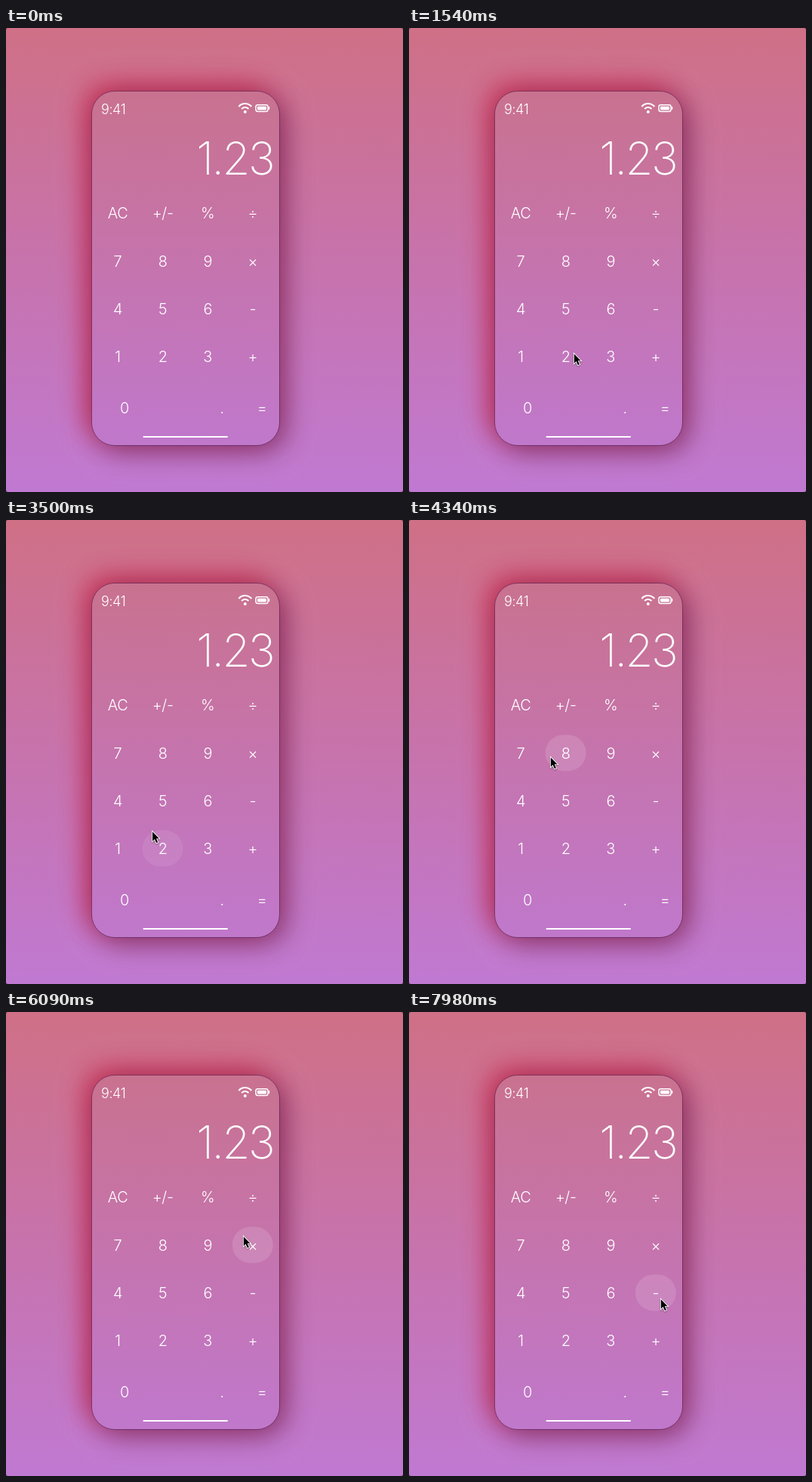
Animation of 526x614 px, one loop 8 s. Source, as an HTML page with a canvas:

```html
<!DOCTYPE html>
<html lang="en">
<head>
<meta charset="utf-8">
<title>Calculator</title>
<style>
html, body { margin: 0; width: 100%; height: 100%; overflow: hidden; background: #5a3a48; }
canvas { display: block; width: 526px; height: 614px; }
</style>
</head>
<body>
<canvas id="stage" width="526" height="614"></canvas>
<script>
const ctx = document.getElementById('stage').getContext('2d');
const LOOP = 8000, STEP = 70, FADE_STEPS = 3;
const FOCUS_TIME = 1820; // hover reacts once the window has been clicked
const FONT = 'Inter, "Open Sans", sans-serif';
const phone = { x: 114, y: 84, w: 248, h: 468, r: 30 };

// Four even rows, then a taller row that shares its width unevenly
const buttons = [...'AC +/- % ÷ 7 8 9 × 4 5 6 - 1 2 3 +'.split(' ').map((label, i) => ({
  label, x: 148 + 59.6 * (i % 4), y: 245 + 63.2 * Math.floor(i / 4), w: 54, h: 48
}))];
const addBottom = (label, x, w) => buttons.push({ label, x, y: 503, w, h: 84 });
addBottom('0', 157, 88);
addBottom('.', 286, 60);
addBottom('=', 339, 46);

// Key points of the pointer's wandering, joined by a smooth curve
const key = (t, x, y) => ({ t, x, y });
const path = [
  key(1050, 262, 515), key(1540, 218, 430), key(1820, 217, 405), key(2200, 216, 404),
  key(2660, 191, 437), key(3080, 160, 494), key(3850, 219, 335), key(4340, 187, 313),
  key(4870, 150, 262), key(5460, 291, 245), key(5700, 342, 262), key(6090, 314, 296),
  key(6860, 150, 320), key(7130, 156, 360), key(7700, 314, 360), key(7980, 333, 379)
];

function slope(i, axis) {
  const a = path[Math.max(i - 1, 0)], b = path[Math.min(i + 1, path.length - 1)];
  return (b[axis] - a[axis]) / (b.t - a.t);
}

function pointerAt(t) {
  const end = path[path.length - 1];
  if (t < path[0].t) return null;
  if (t >= end.t) return end;
  const i = path.findIndex(p => p.t > t) - 1;
  const a = path[i], b = path[i + 1], span = b.t - a.t;
  const k = (t - a.t) / span, rest = 1 - k;
  const along = axis =>
    a[axis] * rest * rest * (1 + 2 * k) + b[axis] * k * k * (3 - 2 * k) +
    span * k * rest * (slope(i, axis) * rest - slope(i + 1, axis) * k);
  return { x: along('x'), y: along('y') };
}

function isOver(button, t) {
  const p = t >= FOCUS_TIME && pointerAt(t);
  return p && Math.abs(p.x - button.x) <= button.w / 2 && Math.abs(p.y - button.y) <= button.h / 2;
}

function hoverLevel(button, t) {
  let level = 0;
  for (let i = 0; i < FADE_STEPS; i++) if (isOver(button, t - i * STEP)) level++;
  return level / FADE_STEPS;
}

function box(x, y, w, h, r) {
  ctx.beginPath();
  ctx.roundRect(x, y, w, h, r);
}

function phoneBox(grow = 0) {
  box(phone.x - grow, phone.y - grow, phone.w + 2 * grow, phone.h + 2 * grow, phone.r + grow);
}

function verticalGradient(y0, y1, ...colors) {
  const g = ctx.createLinearGradient(0, y0, 0, y1);
  colors.forEach((c, i) => g.addColorStop(i / (colors.length - 1), c));
  return g;
}

function text(str, x, y, size, align = 'center', weight = 300, spacing = -0.4) {
  ctx.font = `${weight} ${size}px ${FONT}`;
  ctx.letterSpacing = spacing + 'px';
  ctx.textAlign = align;
  ctx.fillText(str, x, y);
}

function phoneShadow(color, offset) {
  ctx.save();
  ctx.shadowColor = color;
  ctx.shadowBlur = 36;
  ctx.shadowOffsetX = ctx.shadowOffsetY = offset;
  ctx.fillStyle = '#c675a8';
  phoneBox();
  ctx.fill();
  ctx.restore();
}

function drawBackdrop() {
  ctx.fillStyle = '#5a3a48';
  ctx.fillRect(0, 0, 526, 614);
  ctx.fillStyle = verticalGradient(0, 614, '#cf7086', '#c773ac', '#c079d2');
  box(0, 0, 526, 614, 3);
  ctx.fill();
  phoneShadow('rgba(200,38,72,.88)', -9);
  phoneShadow('rgba(115,40,92,.75)', 9);
  ctx.fillStyle = verticalGradient(phone.y, phone.y + phone.h, '#c9728f', '#c574ae', '#c078cc');
  phoneBox();
  ctx.fill();
  ctx.strokeStyle = 'rgba(75,30,75,.5)';
  ctx.lineWidth = 1;
  phoneBox(0.5);
  ctx.stroke();
}

function drawStatusIcons() {
  ctx.strokeStyle = '#fff';
  ctx.lineWidth = 2;
  for (const r of [6, 11]) {
    ctx.beginPath();
    ctx.arc(316.8, 111, r, -Math.PI * 0.78, -Math.PI * 0.22);
    ctx.stroke();
  }
  ctx.beginPath();
  ctx.arc(316.8, 111, 2, 0, Math.PI * 2);
  ctx.fill();
  ctx.lineWidth = 1.5;
  box(331, 101.8, 16, 8.6, 2.5);
  ctx.stroke();
  box(333, 103.7, 12, 4.8, 1);
  ctx.fill();
  ctx.fillRect(348, 104, 1.2, 4);
}

function drawPointer({ x, y }) {
  ctx.save();
  ctx.translate(x + 0.8, y + 1.2);
  ctx.scale(0.86, 0.86);
  ctx.beginPath();
  [[0, 0], [0, 14.5], [3.3, 11.4], [5.9, 17.3], [8.3, 16.3], [5.7, 10.5], [10.2, 10.5]]
    .forEach(p => ctx.lineTo(...p));
  ctx.closePath();
  ctx.shadowColor = 'rgba(0,0,0,.35)';
  ctx.shadowBlur = 2;
  ctx.shadowOffsetY = 1;
  ctx.strokeStyle = '#fff';
  ctx.lineWidth = 2;
  ctx.stroke();
  ctx.shadowColor = 'transparent';
  ctx.fillStyle = '#000';
  ctx.fill();
  ctx.restore();
}

function draw(t) {
  drawBackdrop();
  for (const b of buttons) {
    const level = hoverLevel(b, t);
    if (!level) continue;
    ctx.fillStyle = `rgba(255,255,255,${0.125 * level})`;
    box(b.x - b.w / 2, b.y - b.h / 2, b.w, b.h, b.h / 2);
    ctx.fill();
  }
  ctx.fillStyle = '#fff';
  text('9:41', 126, 114, 18, 'left');
  text('1.23', 354, 194, 60, 'right', 200, -2.6);
  for (const b of buttons) text(b.label, b.x, b.y + 7.3, 20);
  drawStatusIcons();
  box(181.5, 540, 112.5, 2, 1);
  ctx.fill();
  const pointer = pointerAt(t);
  if (pointer) drawPointer(pointer);
}

function tick() {
  const t = performance.now() % LOOP;
  draw(Math.floor(t / STEP) * STEP);
  requestAnimationFrame(tick);
}
tick();
</script>
</body>
</html>
```
